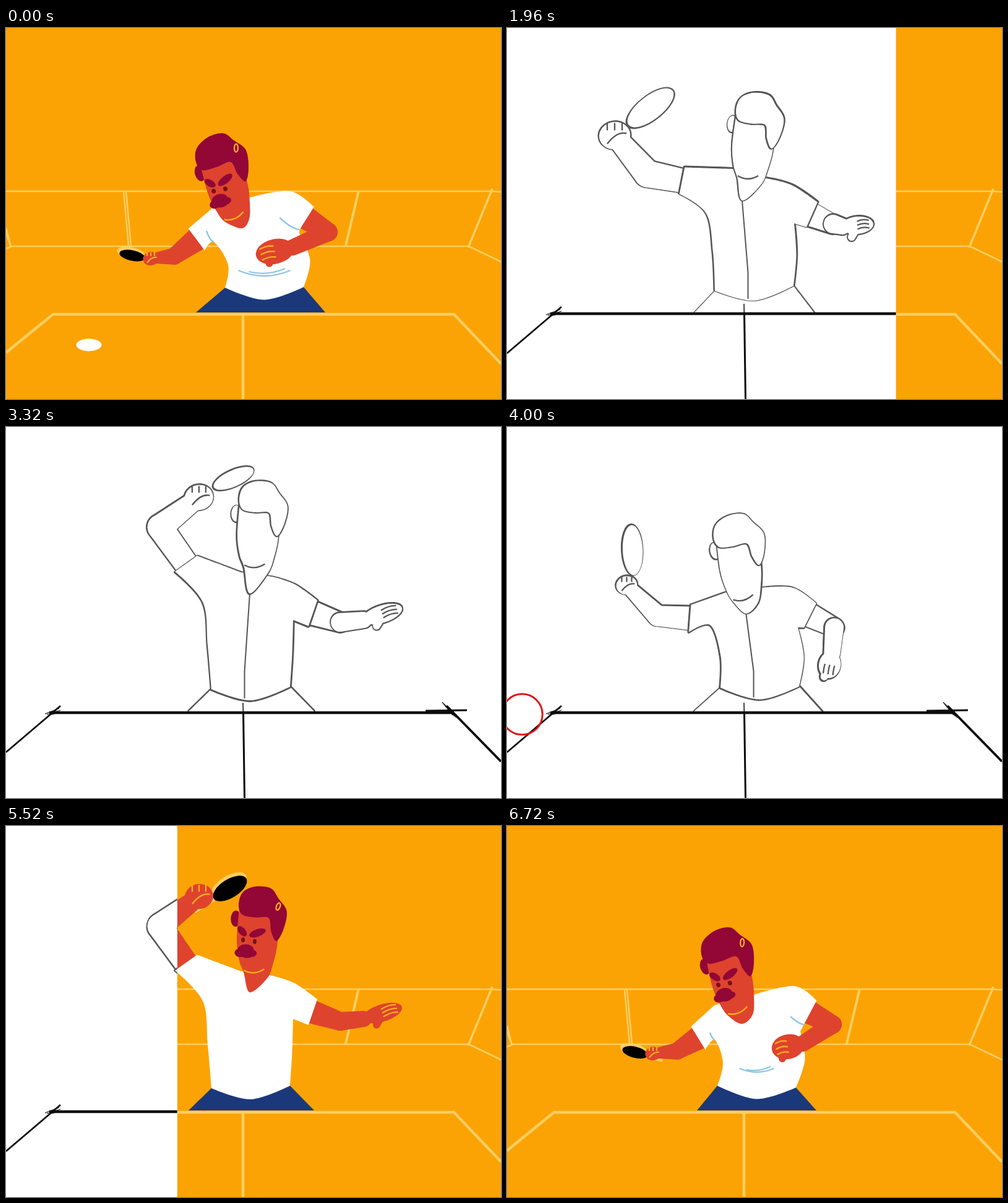
Animation of 800 by 600 pixels, one loop 6.76 s. Source, as an HTML page with a canvas:

```html
<!DOCTYPE html>
<html lang="en">
<head>
<meta charset="utf-8">
<title>Table tennis</title>
<style>
html, body { margin: 0; width: 100%; height: 100%; overflow: hidden; background: #fba304; }
canvas { display: block; }
</style>
</head>
<body>
<canvas id="stage" width="800" height="600"></canvas>
<script>
const ctx = document.getElementById('stage').getContext('2d');
const LOOP = 6760, STROKE = LOOP / 9, RAD = Math.PI / 180;
const ORANGE = '#fba304', CHALK = '#ffce62', SKIN = '#de432e', HAIR = '#920735';
const CREASE = '#ffae20', BLUE = '#8cc5ea', GRAY = '#555', INK = '#0c0c0c';
let sketch = false, seed = 1;

const random = () => (seed = seed * 16807 % 2147483647) / 2147483647;
const lerp = (a, b, k) => a + (b - a) * k;
const clamp = (v, a, b) => Math.min(b, Math.max(a, v));
const smooth = k => k * k * (3 - 2 * k);
const mod = (a, n) => (a % n + n) % n;
const mix = (a, b, k) => typeof a === 'number' ? lerp(a, b, k)
  : Array.isArray(a) ? a.map((v, i) => mix(v, b[i], k))
  : Object.fromEntries(Object.keys(a).map(key => [key, mix(a[key], b[key], k)]));

// Joints of the key poses. racketArm: sleeve, elbow, fist; freeArm: sleeve, elbow, wrist, tip
const low = {
  head: [358, 258], tilt: -17, flop: .12, chest: [381, 324],
  collar: [[335, 290], [402, 272]], shoulder: [460, 264],
  armpits: [[336, 346], [474, 332]], waist: [[354, 420], [481, 419]], feet: [307, 516],
  sway: 14, fold: 42, fist: 12, palm: 20,
  racketArm: [[308, 342], [272, 369], [234, 373]], paddle: [204, 368, 21, 8.5, -168],
  freeArm: [[486, 308], [521, 330], [463, 355], [406, 368]]
};
const rise = {
  ...low, head: [364, 252], tilt: -15, chest: [380, 320], shoulder: [465, 259],
  waist: [[340, 420], [467, 423]], feet: [307, 500], sway: 11, fold: 28,
  racketArm: [[309, 343], [275, 364], [236, 368]], paddle: [207, 366, 21, 9, -166],
  freeArm: [[490, 302], [526, 321], [478, 352], [430, 362]]
};
const high = {
  head: [406, 186], tilt: 2, flop: 0, chest: [394, 269],
  collar: [[380, 235], [430, 242]], shoulder: [466, 254],
  armpits: [[318, 283], [464, 312]], waist: [[332, 424], [459, 420]], feet: [295, 498],
  sway: 1, fold: 0, fist: 22, palm: 14,
  racketArm: [[291, 221], [249, 162], [312, 114]], paddle: [362, 101, 31, 15, -32],
  freeArm: [[496, 301], [540, 316], [578, 312], [638, 293]]
};
const cock = {
  head: [393, 211], tilt: 5, flop: 1, chest: [380, 279],
  collar: [[370, 228], [418, 243]], shoulder: [460, 254],
  armpits: [[322, 300], [464, 316]], waist: [[336, 425], [463, 417]], feet: [303, 496],
  sway: 4, fold: 12, fist: 24, palm: 14,
  racketArm: [[283, 247], [227, 236], [174, 174]], paddle: [232, 129, 45, 19, -38],
  freeArm: [[493, 302], [527, 317], [542, 321], [590, 317]]
};
// Passing pose: racket arm stretched out to the side, free arm unfolding
const pass = {
  ...mix(low, high, .5),
  racketArm: cock.racketArm.map(([x, y]) => [x + 10, y + 55]), paddle: [203, 160, 45, 18, -75],
  freeArm: [[491, 304], [531, 323], [540, 368], [544, 412]]
};
const painted = { low, pass, high, cock, rise };
const pencilled = {
  ...painted,
  high: { ...high, head: [407, 176], paddle: [368, 83, 35, 13, -24] },
  cock: { ...cock, head: [397, 193], flop: 0 }
};
const KEYS = [[0, 'low'], [48, 'low'], [140, 'pass'], [263, 'high'], [409, 'cock'], [711, 'rise'], [STROKE, 'low']];

function poseAt(t, set) {
  const q = mod(t, STROKE);
  const i = KEYS.findIndex((k, n) => q < KEYS[n + 1][0]);
  const [a, from] = KEYS[i], [b, to] = KEYS[i + 1];
  return mix(set[from], set[to], smooth((q - a) / (b - a)));
}

// Paths
function oval(x, y, rx, ry, deg = 0) {
  const path = new Path2D();
  path.ellipse(x, y, rx, ry, deg * RAD, 0, 7);
  return path;
}
function taper([x0, y0], [x1, y1], r0, r1) {
  const a = Math.atan2(y1 - y0, x1 - x0), path = new Path2D();
  path.arc(x0, y0, r0, a + Math.PI / 2, a - Math.PI / 2);
  path.arc(x1, y1, r1, a - Math.PI / 2, a + Math.PI / 2);
  path.closePath();
  return path;
}
// Closed smooth curve through the points; listed indices stay sharp
function curve(points, sharp = []) {
  const n = points.length, path = new Path2D(), at = i => points[mod(i, n)];
  const handle = (i, side) => at(i).map((v, d) =>
    sharp.includes(mod(i, n)) ? v : v + side * (at(i + 1)[d] - at(i - 1)[d]) / 6);
  path.moveTo(...at(0));
  for (let i = 0; i < n; i++) path.bezierCurveTo(...handle(i, 1), ...handle(i + 1, -1), ...at(i + 1));
  path.closePath();
  return path;
}

// Several paths join into one silhouette; in pencil its edge is drawn twice, loosely
function paint(color, ...paths) {
  if (sketch) {
    ctx.strokeStyle = GRAY;
    ctx.lineWidth = 3.6;
    for (let pass = 0; pass < 2; pass++) {
      ctx.save();
      ctx.translate((random() - .5) * 2.4, (random() - .5) * 2.4);
      paths.forEach(p => ctx.stroke(p));
      ctx.restore();
    }
  }
  ctx.fillStyle = sketch ? '#fff' : color;
  paths.forEach(p => ctx.fill(p));
}
function line(color, width, ...p) {
  ctx.beginPath();
  for (let i = 0; i < p.length; i += 2) ctx.lineTo(p[i], p[i + 1]);
  ctx.strokeStyle = color;
  ctx.lineWidth = width;
  ctx.stroke();
}
// Arc from a to b whose middle is pushed down by sag
function arc(color, [x0, y0], [x1, y1], sag) {
  ctx.beginPath();
  ctx.moveTo(x0, y0);
  ctx.quadraticCurveTo((x0 + x1) / 2, (y0 + y1) / 2 + sag * 2, x1, y1);
  ctx.strokeStyle = sketch ? GRAY : color;
  ctx.lineWidth = 2.3;
  ctx.stroke();
}

function racket([x, y, rx, ry, deg]) {
  const c = Math.cos(deg * RAD) * rx, s = Math.sin(deg * RAD) * rx;
  if (!sketch) {
    line(CHALK, 9, x - c, y - s, x - c * 2.2, y - s * 2.2);
    paint(CHALK, oval(x - 2, y - 4, rx + 2, ry + 1, deg));
  }
  paint('#000', oval(x, y, rx, ry, deg));
}
function racketArm({ racketArm: [sleeve, elbow, hand], fist: r }) {
  const [x, y] = hand;
  paint(SKIN, taper(sleeve, elbow, 19, 6 + r * .65), taper(elbow, hand, 6 + r * .65, r * .65),
    oval(x, y, r * 1.05, r * .92, -10));
  for (const k of [-.5, 0, .5]) arc(CREASE, [x + k * r, y - r * .85], [x + k * r, y - r * .35], 0);
  arc(CREASE, [x - r * .5, y + r * .55], [x + r * .8, y - r * .15], -r * .25);
}
function forearm({ freeArm: [, elbow, wrist, tip], palm }) {
  const [x, y] = mix(wrist, tip, .5), dx = tip[0] - wrist[0], dy = tip[1] - wrist[1];
  const length = Math.hypot(dx, dy), px = -dy / length * palm, py = dx / length * palm;
  paint(SKIN, taper(elbow, wrist, 15, 13), taper([x, y], [x - 9, y + 19], 8, 6),
    oval(x, y, length / 2 + 2, palm, Math.atan2(dy, dx) / RAD));
  for (const k of [-.45, 0, .45])
    arc(CREASE, [x + px * k, y + py * k], [x + dx * .4 + px * k, y + dy * .4 + py * k], -2);
}

function shirt(p) {
  const hem = ([sleeve, elbow], side) => {
    const dx = elbow[0] - sleeve[0], dy = elbow[1] - sleeve[1], k = side * 22 / Math.hypot(dx, dy);
    return [sleeve[0] - dy * k, sleeve[1] + dx * k];
  };
  const flank = i => {
    const [x, y] = mix(p.armpits[i], p.waist[i], .5);
    return [x + p.sway, y];
  };
  const [x, y] = mix(...p.waist, .5);
  paint('#1b387b', curve([p.waist[0], [p.feet[0], 460], [p.feet[1], 460], p.waist[1]], [0, 1, 2, 3]));
  paint('#fff', curve([
    p.collar[0], hem(p.racketArm, 1), hem(p.racketArm, -1), p.armpits[0], flank(0), p.waist[0], [x, y + 20],
    p.waist[1], flank(1), p.armpits[1], hem(p.freeArm, 1), hem(p.freeArm, -1), p.shoulder, p.collar[1]
  ], [0, 1, 2, 5, 7, 9, 10, 11, 13]));
  if (sketch) return line(GRAY, 2, ...p.chest, x - 10, 395, x - 10, y + 17);
  if (p.fold < 3) return;
  const f = p.fold, k = f / 42, under = hem(p.freeArm, 1);
  arc(BLUE, [x - f, 392], [x + f, 392], 9 * k);
  arc(BLUE, [x - f * .6, 394], [x + f * .8, 389], 5 * k);
  arc(BLUE, [under[0] - 32 * k, under[1] - 20 * k], under, 3 * k);
  arc(BLUE, [p.armpits[0][0] - 12 * k, p.armpits[0][1] - 18 * k], p.armpits[0], 4 * k);
}

// Head features live in a tilted frame centred on the face
function head({ head: [x, y], tilt, flop, chest }) {
  const c = Math.cos(tilt * RAD), s = Math.sin(tilt * RAD), dx = chest[0] - x, dy = chest[1] - y;
  const hair = [[-32, -58], [-26, -78], [-6, -88], [19, -86], [32, -70], [46, -50], [42, -21],
    [31, -1], [22, -16], [17, -38], [-6, -38], [-26, -42]].map(([hx, hy]) => {
    const w = flop * clamp((20 - hx) / 52, 0, 1) ** 2;
    return [hx - 40 * w, hy + 38 * w];
  });
  ctx.save();
  ctx.translate(x, y);
  ctx.rotate(tilt * RAD);
  paint(HAIR, oval(-36, -35, 8, 13));
  paint(SKIN, curve([[-31, -50], [-33, 0], [-28, 32], [-20, 52], [dx * c + dy * s, dy * c - dx * s],
    [18, 60], [27, 35], [33, 0], [31, -50]], [0, 8]));
  paint(HAIR, curve(hair));
  if (!sketch) {
    paint('#761313', ...[[-23, -1], [-4, 1]].map(e => oval(...e, 3 + 4 * flop, 4 - 2 * flop)));
    paint(HAIR, oval(-25, -15, 10, 5.5, 48), oval(0, -13, 14, 6, -22));
    paint(HAIR, oval(-18, 15, 13, 9), oval(-27, 20, 9, 7), oval(-9, 20, 9, 6), oval(-16, 23, 10, 5));
    ctx.strokeStyle = CREASE;
    ctx.lineWidth = 2.2;
    ctx.stroke(oval(32, -57, 3, 6 + 4 * flop, 18));
  }
  arc(CREASE, [-20, 48], [13, 45], 5);
  ctx.restore();
}

function player(p) {
  racket(p.paddle);
  racketArm(p);
  paint(SKIN, taper(p.freeArm[0], p.freeArm[1], 19, 15));
  shirt(p);
  head(p);
  forearm(p);
}

// Ball: landing side, side it returns from (1 is right), return time of each stroke
const RALLY = [[0, 1, 409], [1, 0, 409], [0, 0, 490]];

function ballPath(t) {
  const n = Math.floor(mod(t, STROKE * 3) / STROKE), q = mod(t, STROKE);
  const [out, back, when] = RALLY[n], next = RALLY[(n + 1) % 3][0];
  const side = (right, x) => right ? 800 - x : x;
  const k = (q - when) / 40, bat = [200, 366], far = [side(back, 106), 352];
  if (q < 50) return oval(side(out, sketch ? 138 : 134), 512.5, 20.5, 10);
  if (q < 170) {
    const u = (q - 50) / 120, r = lerp(13, 50, u);
    return oval(side(out, lerp(134, -70, u)), lerp(505, 430, u), r, r);
  }
  if (Math.abs(k) < 1) {
    const near = [side(back, -10), 408], shift = Math.min(0, k), tail = Math.max(0, k) * .8;
    const away = ([x, y]) => [x + (far[0] - near[0]) * shift * 1.7, y - 95 * shift];
    return taper(away(mix(near, far, tail)), away(far), lerp(42, 14, tail), 12 - shift * 30);
  }
  if (k >= 1 && k < 2.5) return oval(...mix(far, bat, (k - 1) / 1.5), 10, 10);
  if (q > 715) {
    const u = (q - 715) / (STROKE - 715), landing = [side(next, 134), 512];
    return taper(mix(bat, landing, u * .6), mix(bat, landing, u), 5, 11);
  }
}
function ball(t) {
  const path = ballPath(t);
  if (!path) return;
  ctx.fillStyle = '#fff';
  ctx.strokeStyle = '#e01414';
  ctx.lineWidth = 3;
  sketch ? ctx.stroke(path) : ctx.fill(path);
}

function paintedCourt() {
  ctx.fillStyle = ORANGE;
  ctx.fillRect(0, 0, 800, 600);
  const wall = (...p) => line(CHALK, 2.6, ...p);
  wall(0, 264, 785, 264, 800, 265);
  wall(0, 357, 10, 353, 748, 353, 800, 378);
  for (const x of [190, 194]) wall(x, 264, x + 8, 352);
  for (const y of [323, 332]) wall(0, y, 8, 354);
  line(CHALK, 4, 570, 263, 549, 352);
  line(CHALK, 3.5, 786, 260, 747, 355);
}
function paintedTable() {
  line(CHALK, 4.5, 0, 525, 76, 463, 724, 463, 800, 543);
  line(CHALK, 4.5, 383, 463, 383, 600);
}
function sketchedTable() {
  line(INK, 4.5, 70, 462, 724, 462);
  line(INK, 2.8, 678, 459, 745, 458);
  line(INK, 2.8, 0, 526, 88, 451);
  line(INK, 3.8, 712, 451, 800, 541);
  line(INK, 1.5, 383, 446, 384, 490);
  line(INK, 3, 383.5, 462, 385.5, 600);
  for (let i = 0; i < 3; i++) {
    line(INK, 1.2, 63 + i * 3, 464 + i, 86 + i * 2, 455 + i * 3);
    line(INK, 1.2, 705 + i * 3, 445 + i * 3, 722 + i * 3, 466 + i * 2);
  }
}

function layer(left, right, draw) {
  if (right <= left) return;
  ctx.save();
  ctx.beginPath();
  ctx.rect(left, 0, right - left, 600);
  ctx.clip();
  draw();
  ctx.restore();
}
// The pencil version trails the painted one, then catches up
const lag = t => t < 3440 ? 50 : t < 3760 ? 90 : Math.max(0, 130 - Math.max(0, t - 4800) / 4);

function frame() {
  const t = Math.floor(performance.now() % LOOP / 40) * 40;
  const edge = clamp(t < 3600 ? (t - 1494) * 1.349 : 800 - (t - 5132) * 1.349, 0, 800);
  seed = 1 + t;
  ctx.lineJoin = 'round';
  layer(edge, 800, () => {
    sketch = false;
    paintedCourt();
    player(poseAt(t, painted));
    paintedTable();
    ball(t);
  });
  layer(0, edge, () => {
    const late = t - lag(t);
    sketch = true;
    ctx.fillStyle = '#fff';
    ctx.fillRect(0, 0, 800, 600);
    player(poseAt(late, pencilled));
    sketchedTable();
    ball(late);
  });
  requestAnimationFrame(frame);
}
frame();
</script>
</body>
</html>
```
